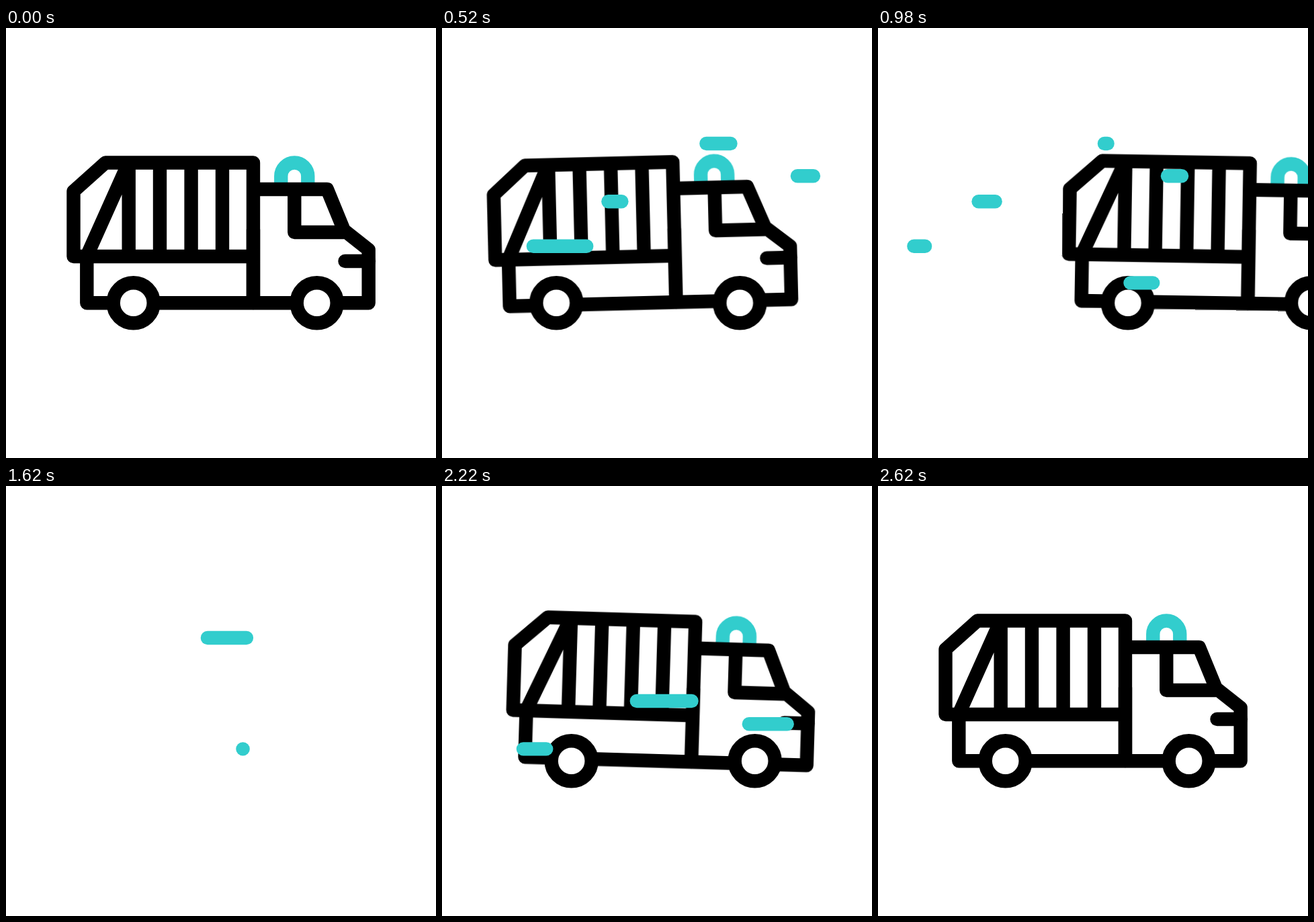
Animation of 640 by 640 pixels, one loop 2.8 s. Source, as an HTML page without scripts:

```html
<!DOCTYPE html>
<html lang="en">
<head>
<meta charset="utf-8">
<title>Truck</title>
<style>
  html, body { margin: 0; width: 100%; height: 100%; overflow: hidden; background: #fff; }
  svg { display: block; width: 100%; height: 100%; }

  .truck { fill: none; stroke: #000; stroke-width: 20.4; stroke-linejoin: round; animation: drive 2.8s linear infinite; }
  .body { transform-origin: 320px 415px; animation: tilt 2.8s linear infinite; }
  .beacon { stroke: #32cdcd; }
  .lamp { stroke-linecap: round; }
  .wheel { fill: #fff; }

  /* back up, drive off to the right, come in from the left, overshoot, settle */
  @keyframes drive {
    0%, 7.857% { transform: translateX(0); animation-timing-function: ease-in-out; }
    17.143% { transform: translateX(-20px); animation-timing-function: cubic-bezier(.33, 0, .67, .17); }
    27.143% { transform: translateX(24.5px); animation-timing-function: cubic-bezier(.33, .155, .67, .575); }
    40.714% { transform: translateX(348px); }
    48.571% { transform: translateX(580px); animation-timing-function: step-end; }
    62.143% { transform: translateX(-580px); }
    69.286% { transform: translateX(-261px); animation-timing-function: cubic-bezier(.33, .86, .67, 1); }
    84.286% { transform: translateX(22px); animation-timing-function: ease-in-out; }
    93.571%, 100% { transform: translateX(0); }
  }

  @keyframes tilt {
    0%, 7.857% { transform: rotate(0); animation-timing-function: ease-in-out; }
    17.143% { transform: rotate(-1.5deg); }
    27.143% { transform: rotate(-.83deg); }
    40.714% { transform: rotate(2.2deg); }
    46.429% { transform: rotate(1deg); }
    52%, 69.286% { transform: rotate(0); }
    79.286% { transform: rotate(1.7deg); }
    82% { transform: rotate(2deg); }
    85% { transform: rotate(1.75deg); animation-timing-function: ease-in-out; }
    93.571%, 100% { transform: rotate(0); }
  }

  /* each streak grows from a dot, slides left and shrinks to a dot again */
  .streaks rect {
    height: 20.4px; rx: 10.2px; fill: #32cdcd; visibility: hidden;
    animation: streak 2.8s linear var(--at) infinite;
  }
  .streaks .quick { animation-name: quick-streak; }

  @keyframes streak {
    0% { x: calc(var(--from) * 1px - 10.2px); width: 20.4px; visibility: visible; }
    14.286% {
      x: calc(var(--head) * 1px - 10.2px);
      width: calc((var(--tail) - var(--head)) * 1px + 20.4px);
      visibility: visible;
    }
    28.571% { x: calc(var(--to) * 1px - 10.2px); width: 20.4px; visibility: visible; }
    28.572%, 100% { x: calc(var(--to) * 1px - 10.2px); width: 20.4px; visibility: hidden; }
  }

  @keyframes quick-streak {
    0% { x: calc(var(--from) * 1px - 10.2px); width: 20.4px; visibility: visible; }
    10.357% {
      x: calc(var(--head) * 1px - 10.2px);
      width: calc((var(--tail) - var(--head)) * 1px + 20.4px);
      visibility: visible;
    }
    24.4% { x: calc(var(--to) * 1px - 10.2px); width: 20.4px; visibility: visible; }
    24.401%, 100% { x: calc(var(--to) * 1px - 10.2px); width: 20.4px; visibility: hidden; }
  }
</style>
</head>
<body>
<svg viewBox="0 0 640 640">
  <g class="truck">
    <g class="body">
      <path class="beacon" d="M409.3 232V220.5a20 20 0 0 1 40 0V232"/>
      <path d="M368 240H478L503 301L539.7 330V409.3H120.3V340"/>
      <path d="M429.3 240V304H503"/>
      <path class="lamp" d="M504.5 347H540"/>
      <path d="M368 409V200.5H148L100.5 243V340H368"/>
      <path d="M182.7 200V340M229 200V340M275.6 200V340M322 200V340M182.7 200L120 340"/>
      <path class="lamp" d="M368 300V409"/>
    </g>
    <circle class="wheel" cx="189.7" cy="409.3" r="30"/>
    <circle class="wheel" cx="462.7" cy="409.3" r="30"/>
  </g>
  <g class="streaks">
    <rect y="161.8" style="--at:.22s; --from:510; --head:355; --tail:403; --to:335"/>
    <rect y="314.6" style="--at:.24s; --from:270; --head:79; --tail:192; --to:49"/>
    <rect y="210" style="--at:.34s; --from:571; --head:478; --tail:531; --to:400"/>
    <rect y="248" style="--at:.37s; --from:290; --head:177; --tail:230; --to:125"/>
    <rect y="369.2" style="--at:.74s; --from:440; --head:333; --tail:389; --to:270"/>
    <rect y="215.8" style="--at:1.4s; --from:385; --head:231; --tail:336; --to:205"/>
    <rect y="381.2" style="--at:1.62s; --from:353; --head:142; --tail:211; --to:100"/>
    <rect y="344" style="--at:1.82s; --from:572; --head:457; --tail:514; --to:390"/>
    <rect class="quick" y="309.8" style="--at:1.93s; --from:394; --head:290; --tail:372; --to:195"/>
  </g>
</svg>
</body>
</html>
```
